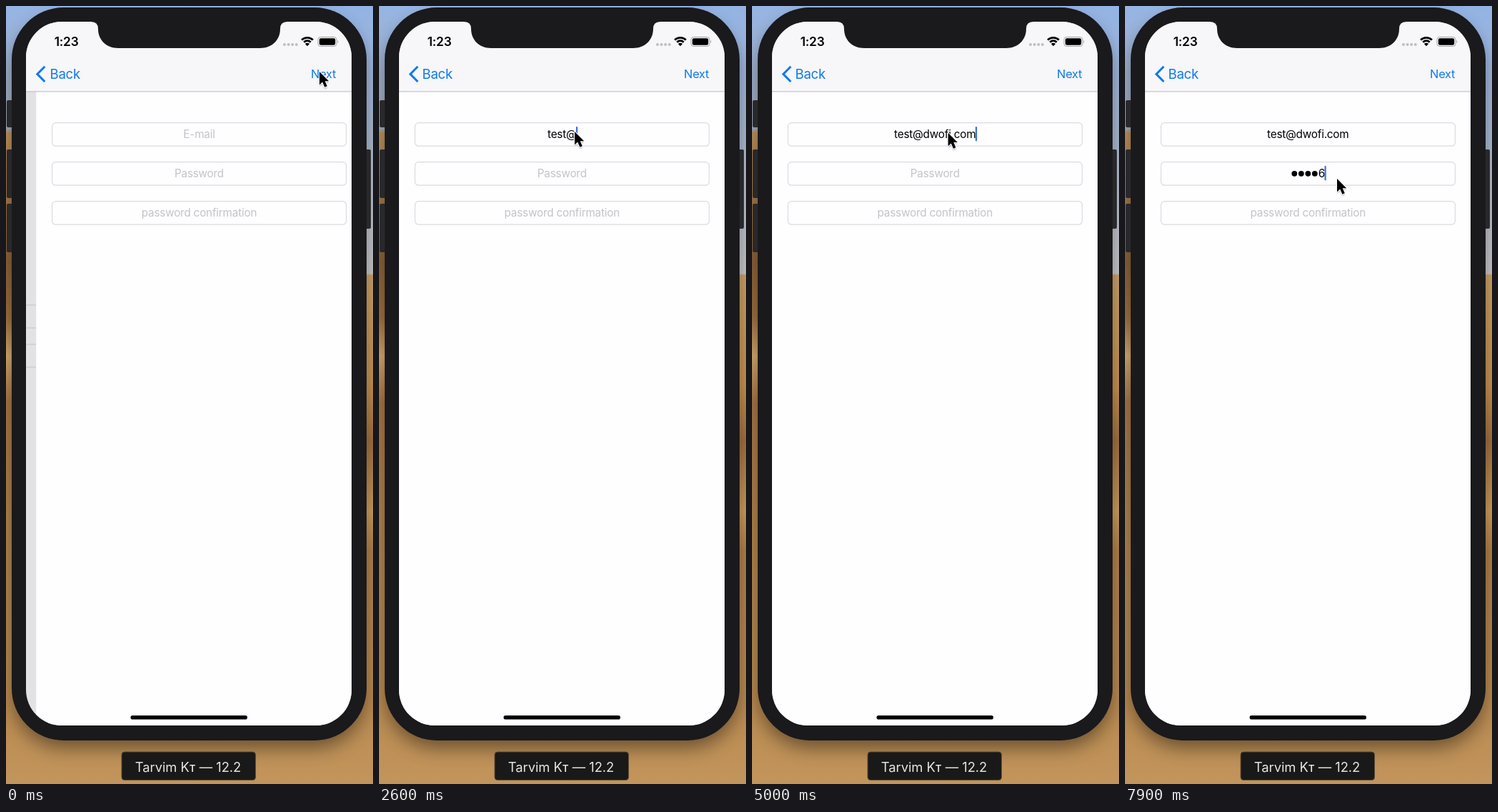
Recreate the animation shown at these times as an HTML page. Size 514 by 1090 pixels, loop 8000 ms.

```html
<!DOCTYPE html>
<html lang="en">
<head>
<meta charset="utf-8">
<title>Sign-up form</title>
<style>
  html, body { margin: 0; width: 100%; height: 100%; overflow: hidden; background: #b58a50; }
  svg { display: block; width: 100vw; height: 100vh; }
  text { font-family: Inter, Roboto, sans-serif; white-space: pre; }
  .mid { text-anchor: middle; }
  .field rect { fill: #fefdff; stroke: #dcdbe1; stroke-width: 1.2; }
  .field text { font-size: 15.3px; letter-spacing: -.22px; text-anchor: middle; fill: #000; }
  .field .hint { fill: #c4c3c8; }
  .link { fill: #0f7aeb; letter-spacing: -.3px; }
</style>
</head>
<body>
<svg viewBox="0 0 514 1090" preserveAspectRatio="none">
  <defs>
    <linearGradient id="left" x2="0" y2="1">
      <stop offset="0" stop-color="#96b5e4"/>
      <stop offset=".158" stop-color="#a5adba"/>
      <stop offset=".163" stop-color="#bd925e"/>
      <stop offset=".33" stop-color="#8a6238"/>
      <stop offset=".40" stop-color="#a07040"/>
      <stop offset=".45" stop-color="#d6aa6e"/>
      <stop offset=".51" stop-color="#a87645"/>
      <stop offset=".66" stop-color="#b2844c"/>
      <stop offset="1" stop-color="#bd9058"/>
    </linearGradient>
    <linearGradient id="right" x2="0" y2="1">
      <stop offset="0" stop-color="#93b3e4"/>
      <stop offset=".25" stop-color="#b6becb"/>
      <stop offset=".344" stop-color="#c8c8ca"/>
      <stop offset=".346" stop-color="#cda367"/>
      <stop offset=".49" stop-color="#c8924f"/>
      <stop offset=".56" stop-color="#a2713f"/>
      <stop offset=".65" stop-color="#cf9d5c"/>
      <stop offset=".70" stop-color="#b38149"/>
      <stop offset="1" stop-color="#bd9058"/>
    </linearGradient>
    <linearGradient id="sand" x2="0" y2="1">
      <stop offset="0" stop-color="#b5864c" stop-opacity="0"/>
      <stop offset=".5" stop-color="#b98a50"/>
      <stop offset="1" stop-color="#c2955c"/>
    </linearGradient>
    <filter id="blur" x="-20%" y="-20%" width="140%" height="140%"><feGaussianBlur stdDeviation="13"/></filter>
    <filter id="soft" x="-50%" y="-50%" width="200%" height="200%"><feGaussianBlur stdDeviation="1.3"/></filter>
    <clipPath id="screen"><rect x="28" y="22" width="456" height="986" rx="50"/></clipPath>
    <path id="arrow" d="M0 0V18.5L4.2 14.6L7.4 21.8L10.8 20.3L7.7 13.2H13.2Z"/>
  </defs>

  <rect width="257" height="1090" fill="url(#left)"/>
  <rect x="257" width="257" height="1090" fill="url(#right)"/>
  <rect y="860" width="514" height="230" fill="url(#sand)"/>
  <rect x="10" y="18" width="493" height="1022" rx="72" opacity=".42" filter="url(#blur)"/>

  <g fill="#29282a">
    <rect x="1" y="132" width="9" height="38" rx="2"/>
    <rect x="1" y="201" width="9" height="68" rx="2"/>
    <rect x="1" y="277" width="9" height="68" rx="2"/>
    <rect x="503" y="201" width="8" height="111" rx="2"/>
  </g>
  <rect x="8" y="2" width="497" height="1027" rx="73" fill="#1a191c"/>

  <g clip-path="url(#screen)">
    <rect x="28" y="22" width="456" height="986" fill="#e2e1e4"/>
    <path d="M28 419H60M28 451H60M28 474H60M28 506H60" stroke="#c3c2c6"/>
    <g id="page">
      <rect x="28" y="119" width="470" height="890" fill="#fefdff"/>
      <g id="fields"></g>
    </g>
    <rect x="28" y="22" width="456" height="97.5" fill="#f7f6f9"/>
    <path d="M28 119.8H484" stroke="#c6c5c9" stroke-width="1.3"/>
  </g>
  <path d="M119 21V22Q129 22 129 32C129 48 141 59 157 59H356C372 59 384 48 384 32Q384 22 394 22V21Z" fill="#1a191c"/>

  <text class="mid" x="84.6" y="56" font-size="17.3" font-weight="600" letter-spacing="-.2">1:23</text>
  <g fill="#bfbec2">
    <circle cx="390" cy="54" r="2"/><circle cx="395.6" cy="54" r="2"/>
    <circle cx="401.2" cy="54" r="2"/><circle cx="406.8" cy="54" r="2"/>
  </g>
  <g id="wifi" fill="none" stroke="#000" stroke-width="2.7"></g>
  <rect x="437" y="43.5" width="26" height="13" rx="3.6" fill="none" stroke="#a5a4a8"/>
  <rect x="438.8" y="45.2" width="22.4" height="9.6" rx="2.2"/>
  <path d="M464.4 47.8Q466.4 50 464.4 52.2Z" fill="#a5a4a8"/>

  <path d="M54.3 84.8L43.8 95.4L54.3 106" fill="none" stroke="#0f7aeb" stroke-width="3"/>
  <text id="back" class="link" x="60.6" y="102" font-size="18.6">Back</text>
  <text class="link mid" x="444.6" y="101" font-size="16.4">Next</text>

  <rect x="174.5" y="994" width="163.5" height="5.6" rx="2.8"/>

  <rect x="162" y="1045" width="187.5" height="39.5" rx="4" fill="#191919" stroke="#5c4a34"/>
  <text class="mid" x="255" y="1072.5" font-size="18.4" letter-spacing="-.05" fill="#e6e5e6">Tarvim K<tspan font-size="13.4" font-weight="600">T</tspan> — 12.2</text>

  <rect id="caret" width="2.2" height="20" fill="#3a6fdc"/>
  <g id="pointer">
    <use href="#arrow" y="2" opacity=".4" filter="url(#soft)"/>
    <use href="#arrow" fill="#000" stroke="#fff" stroke-width="2" stroke-linejoin="round" style="paint-order:stroke"/>
  </g>
</svg>
<script>
const LOOP = 8000, STEP = 100, MID = 256.3, PITCH = 9.5;
const EMAIL = "test@dwofi.com", SECRET = "12356";
const emailKeys = [1400, 1600, 1800, 2000, 2500, 2800, 3000, 3200, 3500, 3700, 4000, 4200, 4500, 4800];
const secretKeys = [7000, 7200, 7400, 7600, 7900];
const emailFocus = 1100, secretFocus = 5800;
// start, end, from, to
const moves = [[500, 1000, [439, 92], [274, 176]], [4900, 5400, [274, 176], [297, 242]]];

const $ = id => document.getElementById(id);
function add(parent, tag, attrs, text = "") {
  const el = document.createElementNS("http://www.w3.org/2000/svg", tag);
  for (const k in attrs) el.setAttribute(k, attrs[k]);
  el.textContent = text;
  return parent.appendChild(el);
}

const fields = ["E-mail", "Password", "password confirmation"].map((label, i) => {
  const y = 163.6 + i * 55;
  const g = add($("fields"), "g", { class: "field" });
  add(g, "rect", { x: 50.4, y, width: 412, height: 32.6, rx: 5 });
  return {
    y, g,
    hint: add(g, "text", { class: "hint", x: MID, y: y + 21.5 }, label),
    value: add(g, "text", { x: MID, y: y + 21.5 })
  };
});
const dots = [...SECRET].map(() => add(fields[1].g, "circle", { cy: fields[1].y + 16.2, r: 3.9 }));

function arc(r) {
  const dx = r * Math.sin(.8), y = 55.3 - r * Math.cos(.8);
  add($("wifi"), "path", { d: `M${422 - dx} ${y}A${r} ${r} 0 0 1 ${422 + dx} ${y}` });
}
[11, 6.6].forEach(arc);
add($("wifi"), "path", { d: "M422 56.3L418.9 53Q422 50.4 425.1 53Z", fill: "#000", stroke: "none" });

const clamp = x => Math.max(0, Math.min(1, x));
const ease = x => x * x * (3 - 2 * x);
const pressed = (keys, t) => keys.filter(k => k <= t).length;

function blink(age) {
  const u = age % 1000;
  return u < 500 ? 1 : Math.max(clamp((700 - u) / 200), clamp((u - 850) / 150));
}

function pointerAt(t) {
  const [start, end, from, to] = t < moves[1][0] ? moves[0] : moves[1];
  const p = ease(clamp((t - start - STEP / 2) / (end - start)));
  return from.map((v, i) => v + (to[i] - v) * p);
}

function drawSecret(n) {
  const at = i => MID + (i - (n - 1) / 2) * PITCH;
  dots.forEach((dot, i) => {
    dot.setAttribute("cx", at(i));
    dot.setAttribute("visibility", i < n - 1 ? "visible" : "hidden");
  });
  fields[1].value.textContent = n ? SECRET[n - 1] : "";
  fields[1].value.setAttribute("x", at(n - 1));
}

function drawCaret(t, width) {
  const inSecret = t >= secretFocus;
  const events = inSecret ? [secretFocus, ...secretKeys] : [emailFocus, ...emailKeys];
  const last = Math.max(...events.filter(e => e <= t));
  const caret = $("caret");
  caret.setAttribute("x", MID + width / 2 - .6);
  caret.setAttribute("y", fields[inSecret ? 1 : 0].y + 5.6);
  caret.setAttribute("opacity", t < emailFocus ? 0 : blink(t - last));
}

function draw(t) {
  const rest = clamp(1 - t / 200);
  $("page").setAttribute("transform", `translate(${14.2 * rest ** 2.3} 0)`);
  $("back").setAttribute("x", 60.6 + rest);

  const nEmail = pressed(emailKeys, t), nSecret = pressed(secretKeys, t);
  const email = fields[0].value;
  email.textContent = EMAIL.slice(0, nEmail);
  drawSecret(nSecret);
  [nEmail, nSecret].forEach((n, i) => fields[i].hint.setAttribute("visibility", n ? "hidden" : "visible"));

  const width = t >= secretFocus ? nSecret * PITCH : nEmail ? email.getComputedTextLength() : 0;
  drawCaret(t, width);
  $("pointer").setAttribute("transform", `translate(${pointerAt(t)})`);
}

const begin = performance.now();
function tick() {
  const t = (performance.now() - begin) % LOOP;
  draw(Math.floor(t / STEP) * STEP);
  requestAnimationFrame(tick);
}
tick();
</script>
</body>
</html>
```
